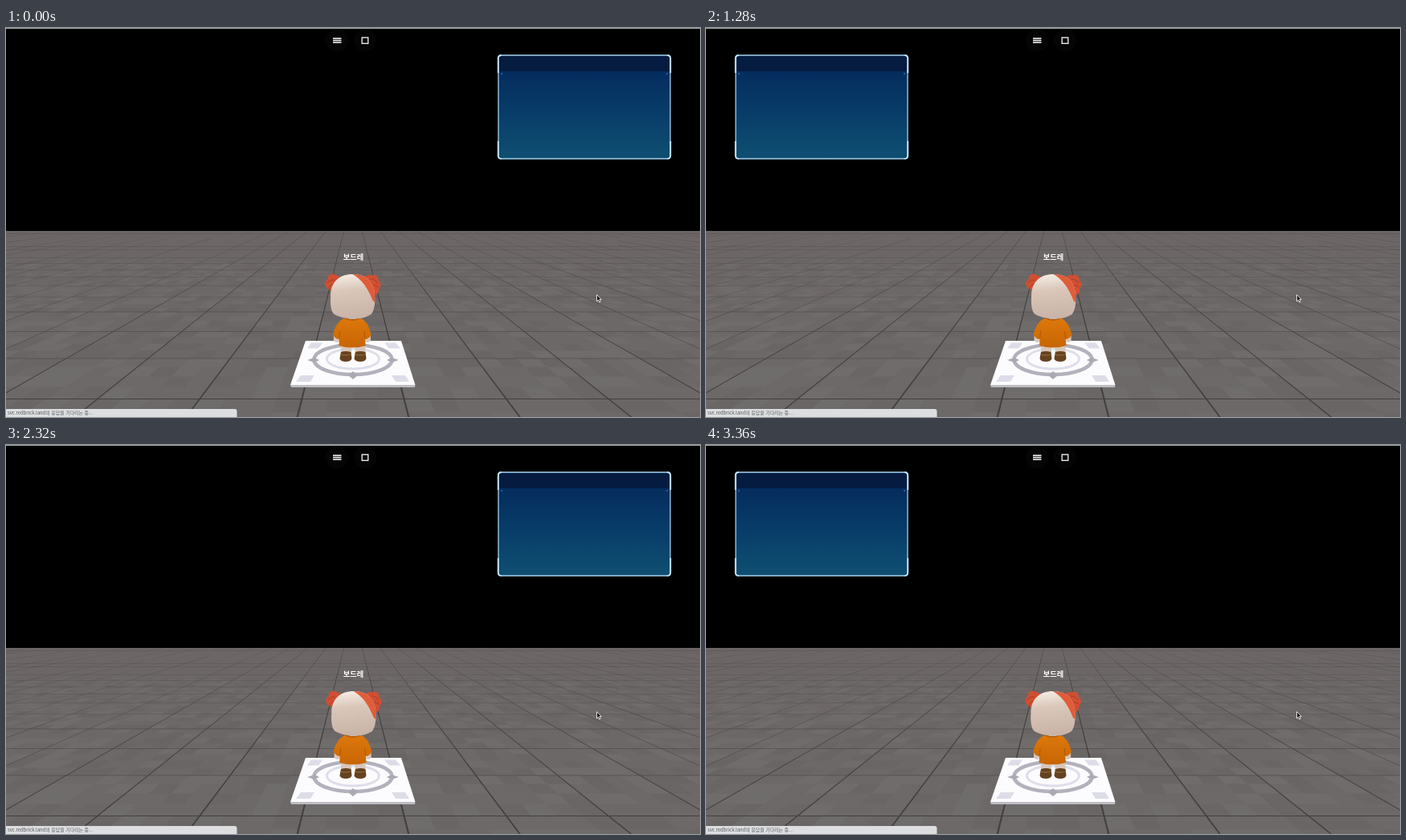
Write an HTML page that moves like this. It is 864 by 485 pixels and loops after 3.44 s.

```html
<!DOCTYPE html>
<html lang="ko">
<head>
<meta charset="utf-8">
<style>
  html, body { margin: 0; width: 100%; height: 100%; overflow: hidden; background: #000; }
  svg { display: block; width: 864px; height: 485px; }
  text { font-family: "Noto Sans CJK KR", "Noto Sans CJK", "Noto Sans CJK JP", sans-serif; }
</style>
</head>
<body>
<svg viewBox="0 0 864 485" xmlns="http://www.w3.org/2000/svg">
  <defs>
    <linearGradient id="ground" x2="0" y2="1">
      <stop offset="0" stop-color="#6c6766"/>
      <stop offset="1" stop-color="#6c6968"/>
    </linearGradient>
    <linearGradient id="screen" x2="0" y2="1">
      <stop offset="0" stop-color="#04265a"/>
      <stop offset=".5" stop-color="#073a67"/>
      <stop offset="1" stop-color="#0f4f72"/>
    </linearGradient>
    <linearGradient id="skin" x1=".4" x2=".5" y2="1">
      <stop offset="0" stop-color="#f5ece3"/>
      <stop offset=".35" stop-color="#dac7ba"/>
      <stop offset="1" stop-color="#c8b3a6"/>
    </linearGradient>
    <linearGradient id="shirt" x2="0" y2="1">
      <stop offset="0" stop-color="#dd780c"/>
      <stop offset="1" stop-color="#c76503"/>
    </linearGradient>
    <clipPath id="floorArea"><rect y="253" width="864" height="232"/></clipPath>
    <clipPath id="headArea"><use href="#headShape"/></clipPath>
  </defs>

  <rect width="864" height="485"/>
  <rect width="864" height="1" fill="#9aa6a1"/>

  <g clip-path="url(#floorArea)">
    <rect y="253" width="864" height="232" fill="url(#ground)"/>
    <path id="lightTiles" fill="#fff" opacity=".025"/>
    <path id="darkTiles" fill="#000" opacity=".03"/>
    <path id="seams" fill="#3c3938" opacity=".85"/>
  </g>

  <g fill="#050506"><circle cx="412" cy="15.500" r="14"/><circle cx="447" cy="15.500" r="14"/></g>
  <path d="M407 13h10.500M407 15.500h10.500M407 18h10.500" stroke="#fff" stroke-width="1.500"/>
  <rect x="443.200" y="11.900" width="7.600" height="7.400" fill="none" stroke="#e8e8e8" stroke-width="1.400"/>

  <g id="panel">
    <rect x="613" y="34" width="214" height="129" rx="4" fill="url(#screen)"/>
    <path d="M613 54V38q0-4 4-4h206q4 0 4 4v16z" fill="#051c40"/>
    <rect x="613" y="34" width="214" height="129" rx="4" fill="none" stroke="#a4d2f2" stroke-width="1.300"/>
    <path d="M612.700 56V38q0-4 4-4M823.300 34q4 0 4 4V56M612.700 141v18q0 4 4 4M823.300 163q4 0 4-4v-18"
      fill="none" stroke="#c4e4fa" stroke-width="1.800"/>
    <g fill="#2a5c94"><circle cx="617" cy="57" r="1.200"/><circle cx="823" cy="57" r="1.200"/></g>
  </g>

  <g id="pad">
    <path d="M354 445H509.500L509 448H355Z" fill="#bdbcc2"/>
    <path d="M373 390H492L509.500 445H354Z" fill="#fcfcfe"/>
    <path d="M380 392.500h14l-5 7h-14zM471 392.500h14l6 7h-14zM367 433h17l-5 8h-18zM480 433h17l5 8h-17z" fill="#dddde8"/>
    <ellipse cx="432" cy="413.500" rx="48.500" ry="18.500" fill="none" stroke="#b3b2bc" stroke-width="4.500"/>
    <ellipse cx="432" cy="412.500" rx="32.500" ry="12.500" fill="none" stroke="#dedeea" stroke-width="3"/>
    <path d="M375 414l9-3 6 3-6 3zM489 414l-9-3-6 3 6 3zM432 428l6 5-6 5-6-5zM432 391l5 4-5 3-5-3z" fill="#aaa9b4"/>
  </g>

  <g id="legs">
    <path d="M417 394h13v13h-13zM434.500 394h13v13h-13z" fill="#d6c6ba"/>
    <path d="M417 404q6-2 12.500 0l1 8q-1 4-7.500 4t-7.500-4zM435 404q6-2 12.500 0l1 8q-1 4-7.500 4t-7.500-4z" fill="#65421f"/>
    <path d="M416.500 407q7 2 13.500 0M434.500 407q7 2 13.500 0" fill="none" stroke="#8b6538" stroke-width="1.300"/>
  </g>
  <g id="torso">
    <path d="M408 383h8v7q-4 4-8 0zM446 383h8v7q-4 4-8 0z" fill="#d9c7ba"/>
    <path d="M421 362Q431 366 442 362Q450 365 455 382Q452 388 447 388L448 396Q431 401 414.500 396L415 388Q410 388 407 382Q411 366 421 362Z" fill="url(#shirt)"/>
    <path d="M415 387l1-9M447 387l-1-9" stroke="#ad5703" stroke-width="1" fill="none"/>
    <path d="M422 361.500q9 5 19 0" fill="none" stroke="#b95d05" stroke-width="1.500"/>
    <rect x="426" y="357" width="11" height="6" rx="2" fill="#c9b5a8"/>
  </g>
  <g id="head">
    <g fill="#d04f33">
      <circle cx="404" cy="319" r="6.500"/><circle cx="407" cy="312.500" r="6"/>
      <circle cx="412" cy="314" r="5.500"/><circle cx="409" cy="323" r="6.500"/>
      <circle cx="452" cy="314" r="6"/><circle cx="458" cy="313.500" r="6"/>
      <circle cx="461" cy="320" r="6"/><circle cx="458" cy="327" r="6.500"/>
    </g>
    <path d="M400 318q4-5 9-4M402 324q4-6 10-5M454 313q6 0 9 5M454 321q6-1 10 2" fill="none" stroke="#ab3b26" stroke-width="1"/>
    <path id="headShape" d="M404.500 334C404.500 317 415 307 432 307S459.500 317 459.500 334C460 344 459 352 455 357Q446 363 432 362.500T409 357C404.500 353 404 344 404.500 334Z" fill="url(#skin)"/>
    <path clip-path="url(#headArea)" d="M430 306Q447 314 457 340L462 344V306Z" fill="#e05c39"/>
  </g>

  <text x="432.500" y="289" text-anchor="middle" font-size="9.200" font-weight="700" fill="#fff">보드레</text>

  <path d="M735.500 332.500v8.300l1.900-1.700 1.300 2.900 1.400-.7-1.300-2.800h2.400z" fill="#111" stroke="#eee" stroke-width=".9"/>

  <path d="M0 475H284.500Q287.500 475 287.500 478V485H0Z" fill="#dcdee0"/>
  <text x="2" y="482" font-size="5.900" fill="#55585c">svc.redbrick.land의 응답을 기다리는 중...</text>
</svg>
<script>
const LOOP = 3440, STEP_MS = 80;
const $ = id => document.getElementById(id);

// Ground plane: x is a slope from the vanishing point, depth is 1 / (y - horizon).
const CENTER = 432, HORIZON = 208, FOCAL = 514;
const TILE = 0.5, ORIGIN = 1 / 204;

function project(x, z) {
  const u = 1 / (ORIGIN + z / FOCAL);
  return `${(CENTER + x * u).toFixed(2)} ${(HORIZON + u).toFixed(2)}`;
}

function quad(x1, x2, z1, z2) {
  return `M${project(x1, z1)}L${project(x2, z1)}L${project(x2, z2)}L${project(x1, z2)}Z`;
}

function random(seed) {
  return () => (seed = (seed * 16807) % 2147483647) / 2147483647;
}

function buildFloor() {
  const NEAR = -0.67, FAR = 9.1, SEAM = 0.0042;
  let seams = '';
  for (let i = -20; i < 20; i++) {
    const x = (i + 0.5) * TILE;
    seams += quad(x - SEAM, x + SEAM, NEAR, FAR);
  }
  for (let j = -1; j <= 18; j++) {
    seams += quad(-10, 10, j * TILE - SEAM, j * TILE + SEAM);
  }
  $('seams').setAttribute('d', seams);

  const rand = random(41), cell = TILE / 4;
  let light = '', dark = '';
  for (let j = -6; j < 30; j++) {
    const reach = Math.ceil(CENTER * (ORIGIN + j * cell / FOCAL) / cell) + 3;
    for (let i = -reach; i < reach; i++) {
      const r = rand();
      const patch = quad(i * cell, (i + 1) * cell, j * cell, (j + 1) * cell);
      if (r < 0.25) light += patch;
      else if (r > 0.78) dark += patch;
    }
  }
  $('lightTiles').setAttribute('d', light);
  $('darkTiles').setAttribute('d', dark);
}

function shift(id, x) {
  $(id).setAttribute('transform', `translate(${x.toFixed(3)} 0)`);
}

function render(time) {
  const t = Math.floor((time % LOOP) / STEP_MS) * STEP_MS;
  const onLeft = (t >= 800 && t < 1800) || t >= 2800;
  shift('panel', onLeft ? -576 : 0);

  const sway = Math.cos((t - 860) / 1840 * 2 * Math.PI);
  shift('head', 0.5 + 0.9 * sway);
  shift('torso', 0.5 + 0.6 * sway);
}

buildFloor();
const start = performance.now();
function tick() {
  render(performance.now() - start);
  requestAnimationFrame(tick);
}
tick();
</script>
</body>
</html>
```
